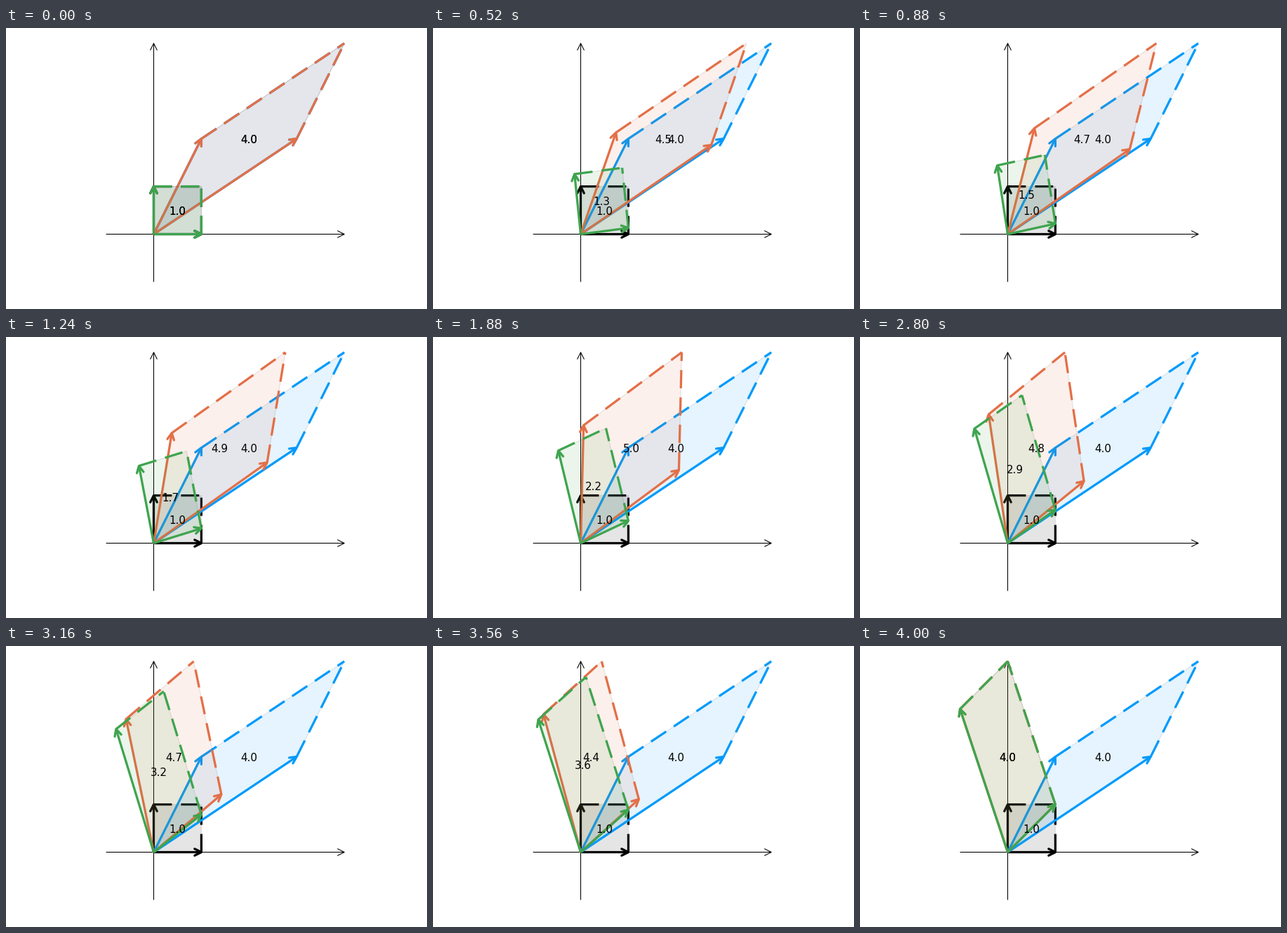
Animation, 600 px wide and 400 px high, one loop 4.04 s. Source, as a matplotlib script:

```python
import numpy as np
import matplotlib.pyplot as plt
from matplotlib.animation import FuncAnimation
from matplotlib.patches import Polygon

W, H, DPI = 600, 400, 100
UNIT = 67.92                   # pixels per data unit
OX, OY = 210.5, 293.5          # origin in pixels
FRAMES, STEP = 101, 40
HEAD_LEN, HEAD_HALF = 9.6 / UNIT, 4.8 / UNIT

BLACK = (0, 0, 0)
BLUE = (0.0, 0.6056, 0.9787)
ORANGE = (0.8889, 0.4356, 0.2781)
GREEN = (0.2422, 0.6433, 0.3044)

plt.rcParams["font.family"] = "DejaVu Sans"
plt.rcParams["path.snap"] = False


def pt(px):
    return px * 72 / DPI


fig = plt.figure(figsize=(W / DPI, H / DPI), dpi=DPI, facecolor="white")
ax = fig.add_axes([0, 0, 1, 1])
ax.set_xlim(-OX / UNIT, (W - OX) / UNIT)
ax.set_ylim((OY - H) / UNIT, OY / UNIT)
ax.axis("off")


def chevron(start, tip):
    """Three points of an open arrow head."""
    d = (tip - start) / np.hypot(*(tip - start))
    side = np.array([-d[1], d[0]]) * HEAD_HALF
    back = tip - d * HEAD_LEN
    return np.array([back + side, tip, back - side])


class Arrow:
    def __init__(self, color, width, z):
        style = dict(color=color, lw=pt(width), zorder=z)
        self.shaft, = ax.plot([], [], solid_capstyle="butt", **style)
        self.head, = ax.plot([], [], solid_capstyle="round",
                             solid_joinstyle="round", **style)

    def place(self, start, tip):
        start, tip = np.asarray(start, float), np.asarray(tip, float)
        self.shaft.set_data(*np.array([start, tip]).T)
        self.head.set_data(*chevron(start, tip).T)


class Parallelogram:
    """Area spanned by two vectors, labelled with its determinant."""

    def __init__(self, color, z):
        self.area = Polygon(np.zeros((4, 2)), closed=True, zorder=z,
                            fc=(*color, 0.1), ec=(0, 0, 0, 0.1), lw=pt(1.08))
        ax.add_patch(self.area)
        self.edges = [ax.plot([], [], color=color, lw=pt(3.24), zorder=z + 0.1,
                              ls=(0, (8, 4)), dash_capstyle="butt")[0]
                      for _ in range(2)]
        self.arrows = [Arrow(color, 3.24, z + 0.2) for _ in range(2)]
        self.label = ax.text(0, 0, "", fontsize=pt(15.1), color="black",
                             ha="center", va="center_baseline", zorder=20)

    def place(self, u, v):
        far = u + v
        self.area.set_xy([(0, 0), u, far, v])
        for edge, arrow, tip in zip(self.edges, self.arrows, (u, v)):
            edge.set_data(*np.array([tip, far]).T)
            arrow.place((0, 0), tip)
        self.label.set_position(far / 2)
        self.label.set_text(f"{u[0] * v[1] - u[1] * v[0]:.1f}")


for start, tip in (((-1, 0), (4, 0)), ((0, -1), (0, 4))):
    Arrow(BLACK, 1.08, 1).place(start, tip)

# Rows are the two spanning vectors.
square = np.eye(2)
slanted = np.array([[3.0, 2.0], [1.0, 2.0]])
goal = np.array([[1.0, 1.0], [-1.0, 3.0]])

Parallelogram(BLACK, 2).place(*square)
Parallelogram(BLUE, 3).place(*slanted)
movers = [(Parallelogram(ORANGE, 4), slanted),
          (Parallelogram(GREEN, 5), square)]


def update(i):
    t = i / (FRAMES - 1)
    for shape, start in movers:
        shape.place(*(start + t * (goal - start)))
    return []


anim = FuncAnimation(fig, update, frames=FRAMES, interval=STEP,
                     init_func=lambda: update(0), repeat=True,
                     repeat_delay=0, blit=False)
plt.show()
```
